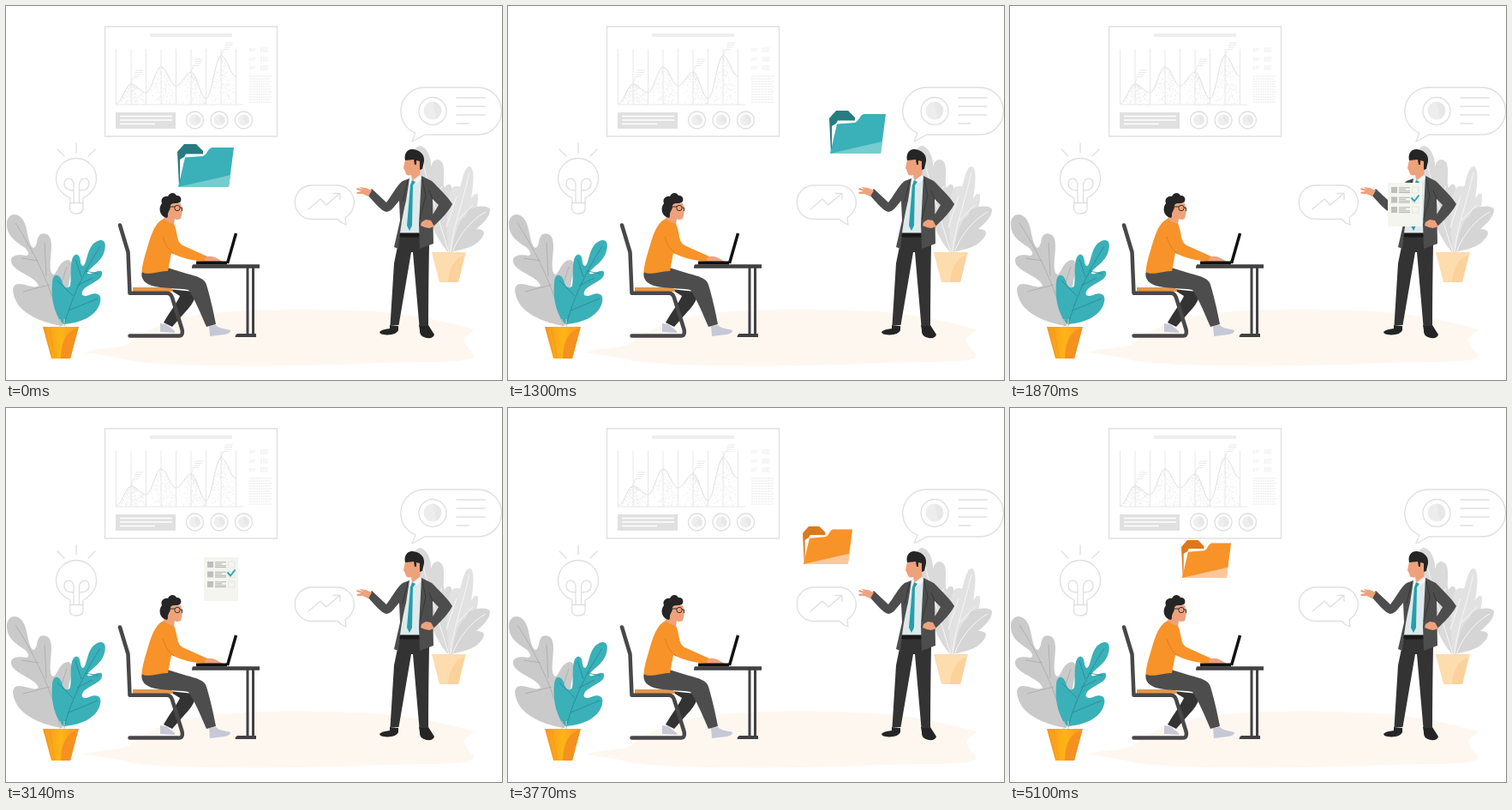
Animation, 579 px wide and 436 px high, one loop 5.77 s. Source, as an HTML page:

```html
<!DOCTYPE html>
<html lang="en">
<head>
<meta charset="utf-8">
<title>Sharing files</title>
<style>
html, body { margin: 0; width: 100%; height: 100%; overflow: hidden; background: #fff; }
svg { display: block; width: 100%; height: 100%; }
.line { fill: none; stroke: #dfdfdf; stroke-width: 1.3; }
.thin { fill: none; stroke: #e2e2e2; stroke-width: .8; }
.round { stroke-linecap: round; stroke-linejoin: round; }
.skin { fill: #eea27b; }
.dark { fill: #333; }
.suit { fill: #4d4d4d; }
.hair { fill: #252525; }
.teal { --back: #267c80; --front: #3ab0b9; --light: #76cccf; }
.orange { --back: #dc791d; --front: #f89329; --light: #fcc89a; }
</style>
</head>
<body>
<svg viewBox="0 0 579 436">
  <defs>
    <linearGradient id="potFill"><stop stop-color="#f7981d"/><stop offset=".5" stop-color="#fdb515"/><stop offset="1" stop-color="#f7981d"/></linearGradient>
    <g id="folder">
      <path d="M0 9 8 0H22L30 8V20L2 49Z" fill="var(--back)"/>
      <path d="M3 18 8 15 10 11.500H34V20L3 47Z" fill="#fff"/>
      <path d="M9 15.500 30 14Q33 13 35 9T40 4H66L60 50H1Z" fill="var(--front)"/>
      <path d="M1 50 62 36 60 50Z" fill="var(--light)"/>
    </g>
    <g id="row">
      <path d="M4 0H11V7H4Z" fill="#bebebe"/>
      <path d="M13 .8H26M13 2.8H21M13 4.8H26M13 6.6H26" stroke="#aaa" stroke-width=".9"/>
      <path d="M28.500 0H36V7H28.500Z" class="thin"/>
    </g>
    <g id="list">
      <path d="M0 0H40V51H0Z" fill="#f4f5ee"/>
      <use href="#row" y="5"/><use href="#row" y="16.500"/><use href="#row" y="28"/>
      <path d="M27.500 17.500 31 21.500 36.500 14.500" fill="none" stroke="#2aabb3" stroke-width="2"/>
    </g>
    <g id="dial">
      <circle r="10" class="line"/><circle r="6.500" fill="#eee"/>
      <path d="M0 0V-6.500A6.500 6.500 0 0 1 4 5Z" fill="#e8e8e8"/>
    </g>
    <g id="note" class="thin"><path d="M1 0H10M0 2.500H9M0 5H7M5 7.500H-1L-4 15"/></g>
  </defs>

  <path fill="#fef7f0" d="M91 404C104 398 134 400 144 393C156 383 180 367 225 360C285 351 375 353 430 356C479 360 518 369 547 377C540 384 533 386 536 392C538 400 548 404 546 409C538 417 492 414 438 416C350 420 210 422 148 414C130 410 109 406 91 404Z"/>

  <g id="panel">
    <path class="line" d="M115.500 24H316.500V152H115.500Z"/>
    <path d="M168 32H264V36H168Z" fill="#eee"/>
    <path id="grid" class="thin"/>
    <path id="dots" fill="none" stroke="#dedede" stroke-width=".7"/>
    <path id="curve" class="line" style="stroke-width:1"/>
    <use href="#note" x="150" y="75"/><use href="#note" x="220" y="62"/><use href="#note" x="255" y="43"/>
    <path id="legend" class="thin" stroke-dasharray="2 .7"/>
    <path d="M128 124H198V143H128Z" fill="#e0e0e0"/>
    <path d="M133 128.500H194M133 133H194M133 137.500H174" stroke="#fff" stroke-width="1.500"/>
    <use href="#dial" x="220.500" y="133"/><use href="#dial" x="249" y="133"/><use href="#dial" x="277.500" y="133"/>
  </g>

  <g id="bulb" class="line round">
    <path d="M75 230V224C65 219 58.500 211 58.500 201A23.500 23.500 0 0 1 105.500 201C105.500 211 99 219 90 224V230"/>
    <path d="M74.500 229.500H90V237Q89 242 82 242T74.500 237Z"/>
    <path d="M79 229V208C78 199 68 199 68 207C68 212 72 215 79 215M85.500 229V208C87 199 97 199 97 207C97 212 93 215 85.500 215"/>
    <path d="M60 167 68 175M82 160V171M104 167 96 175"/>
  </g>

  <g id="bubbles" class="line round">
    <path d="M357 209H386A20 20 0 0 1 396 246.500L397 255Q391 253 387 248.500H357A19.750 19.750 0 0 1 357 209Z"/>
    <path d="M353 237 367 225 374 232 389 219M382 218.500H390V225.500"/>
    <path d="M488 95H551A27.500 27.500 0 0 1 551 150H489L474 158 478 148A27.500 27.500 0 0 1 488 95Z"/>
    <circle cx="498" cy="122.500" r="16"/>
    <circle cx="498" cy="122" r="10.500" fill="#ededed" stroke="none"/>
    <path d="M498 111.500A10.500 10.500 0 0 1 502 131.500Z" fill="#e7e7e7" stroke="none"/>
    <path d="M526 107H559M526 117H559M526 127H559M526 137H540"/>
  </g>

  <g id="rightPlant">
    <path fill="#dadada" d="M516 287C500 270 488 235 480 200C473 177 475 163 484 163C492 165 497 179 496 188C498 178 506 176 510 184C513 196 509 205 512 212C517 204 521 208 521 218L522 287Z"/>
    <path fill="#e2e2e2" d="M517 287C513 255 514 218 522 211C528 208 530 213 531 208C534 195 537 186 542 187C548 192 545 210 543 225C545 220 550 216 551 221C552 237 540 262 518 287Z"/>
    <path fill="#d5d5d5" d="M520 287C523 268 528 252 534 247C541 242 536 238 544 236C553 232 563 233 565 237C565 246 557 253 549 260C558 260 561 264 554 272C545 283 532 283 520 287Z"/>
    <path fill="none" stroke="#f7f7f7" d="M484 173C492 205 505 250 517 287M541 194C533 230 521 260 519 287M500 228 509 210M514 258 526 222M527 250 545 232M560 240C543 249 528 268 521 287"/>
    <path fill="#fddcae" d="M497 287H537L528 322H506Z"/>
    <path fill="#fbd19c" d="M516 322C517 307 524 293 535 291L528 322Z"/>
  </g>

  <g id="leftPlant">
    <path fill="#cacaca" d="M66 373C50 371 25 363 14 348C6 335 6 324 15 324C23 324 33 330 38 326C35 316 13 311 7 301C2 290 15 289 24 291C28 290 26 285 21 281C8 273 0 266 1 252C3 242 11 241 17 246C25 253 24 268 29 279C32 284 34 282 36 276C37 266 42 264 47 266C55 269 53 283 52 295C51 306 52 313 56 313C61 309 62 297 73 296C79 298 77 310 74 320Z"/>
    <path fill="none" stroke="#a9a9a9" stroke-width=".8" d="M11 253C34 288 54 330 64 373M38 297 18 294M47 315 45 276M51 325 20 333M58 343 71 304"/>
    <path fill="#3ab0b9" d="M67 371C57 361 52 341 54 322C55 311 62 312 65 320C67 328 72 331 75 326C77 314 73 292 82 289.500C89 291 85 302 90 303C95 301 94 281 105 275C113 270 118 275 115 285C112 299 97 305 95 311C96 316 109 305 112 310C114 320 97 323 90 331C86 338 91 339 97 337C106 333 112 336 110 345C106 363 84 370 67 371Z"/>
    <path fill="none" stroke="#258890" stroke-width=".8" d="M110 280C96 302 77 336 68 372M92 309 108 312M88 316 81 295M83 326 101 317M78 338 60 320M73 355 107 341"/>
    <path d="M63 365V375M68 365V375" stroke="#cfcfcf"/>
    <path fill="url(#potFill)" d="M43 374H85L75 411H53Z"/>
    <path fill="#f59120" d="M64 411C64 394 70 378 84 376L75 411Z"/>
    <path d="M44 375 54 410M51 376 57 410" stroke="#f59120" stroke-width="1" opacity=".6"/>
  </g>

  <g id="worker">
    <path class="dark" d="M190 330 219 333C224 338 217 349 209 357L194 374 184 369C190 358 199 347 203 338Z"/>
    <path fill="#c6c8d6" d="M180 370 187 371 197 379V381L180 380ZM237 373 245 372C250 377 258 376 262 378Q262 382 255 383L238 385Z"/>
    <path fill="#e69648" d="M148 328H190Q195 329 195 333H148Z"/>
    <path fill="none" stroke="#494748" stroke-width="4.500" class="round" d="M133 255.500 142.500 287 144.500 334.800H187Q192 334 194 340L205.500 377Q207 384.500 202 384.500H144.500"/>
    <path class="suit" d="M159 309C156 318 163 325 174 327C190 330 207 329 213 331C221 343 227 358 234 374L245 371C242 355 238 338 234 325C232 317 222 315 211 312L185 304Z"/>
    <path class="skin" d="M190 231 204 230 206 239 204 248Q199 250 197 248L196 255 183 251Z"/>
    <path class="hair" d="M188 247C180 246 177 236 182 230C180 225 184 221 189 222C191 217 197 217 199 221C204 220 206 226 203 229C199 231 195 229 192 232C193 237 188 240 189 245Z"/>
    <g fill="none" stroke="#38302e"><circle cx="200" cy="235.500" r="3.200"/><path d="M190 234H197M203 235H205.500V239"/></g>
    <path fill="#f79329" d="M184 248C173 253 169 268 164 285C161 295 159 302 158.500 310C165 315 181 308 189 309L193 288C205 294 219 297 232 298L235 292 206 279C198 274 201 264 196 254Q188 252 184 248Z"/>
    <path fill="none" stroke="#dd7719" stroke-width=".8" d="M183 269Q187 283 196 289"/>
    <path class="skin" d="M234 292Q241 291 246 294L253 298H231Z"/>
    <path d="M222 297.500H258V301.500H222Z" fill="#111"/>
    <path d="M258.500 300 268.500 265" stroke="#111" stroke-width="3.500"/>
    <g fill="#414042">
      <path d="M219 301.300H296V305.700H217Q217 301.300 219 301.300ZM280.500 305H283.500V383H280.500ZM287 305H290V383H287Z"/>
      <path d="M270 382H292V386H267.500Q267.500 383 270 382Z"/>
    </g>
  </g>

  <g id="presenter">
    <path class="hair" d="M448 372 458 373V378Q456 383 445 383.500 436 383 436 380 438 377 448 376ZM482 372H493L500 383Q499 388 491 387 482 385 483 378Z"/>
    <path class="dark" d="M460 266H482L494 277Q493 330 493 373H482.500L475 287H473L458.500 372H448.500L453 300Z"/>
    <path fill="#dfe9ec" d="M468 203 474 197 483 199 487 215 482 265H459Z"/>
    <path class="skin" d="M466 179 483 175 484 188 483 199 475 205 473 197Q467 199 466 193L464 189Z"/>
    <path class="hair" d="M466 180C464 172 469 166 475 167C483 168 489 173 488 181L486 190 483 191V181L479 180V185L477 185 476 179Z"/>
    <path fill="#f1f5f6" d="M474 204 483 197 486 201 478 208ZM472 200 475 204 471 209 468 204Z"/>
    <path fill="#23a0aa" d="M474 203 478 205 475 209 474 256 471 262 468 256 472 209Z"/>
    <path d="M459 264.500H483V269.500H459Z" fill="#191919"/>
    <path class="suit" d="M471 201 463 204C456 209 450 222 444 229L427 213 422 220C430 229 438 239 444 240C450 240 455 231 459 227L460 250 453 281 458 283C460 259 464 239 467 227Z"/>
    <path class="suit" d="M485 198 497 204C507 214 518 225 521 231C517 240 506 250 499 257L494 250 505 232 498 225 499 277 483 283 482 255Z"/>
    <path d="M486 202 490 221 483 249M498 225 494 215M463 228 469 203" fill="none" stroke="#343434" stroke-width=".9"/>
    <path class="skin" d="M427 215 423 222 416 219 410 219 409 217 415 216 409 214 410 212 417 214 412 211 420 212ZM496 250 490 249 485 252 484 256 489 258 494 259 500 257Z"/>
  </g>

  <use id="mover"/>
</svg>
<script>
const LOOP = 5770;
// start time, shape, colour class, x, y, scale
const poses = [
  [0, "folder", "teal", 200, 161, 1],
  [700, "folder", "teal", 286, 101, 1],
  [1300, "folder", "teal", 375, 122, 1],
  [1870, "list", "", 441, 206, 1],
  [2470, "list", "", 310, 142, 1],
  [3140, "list", "", 231, 174, 1],
  [3740, "", "", 0, 0, 1],
  [3770, "folder", "orange", 344, 138, .88],
  [4400, "folder", "orange", 275, 129, .88],
  [5100, "folder", "orange", 200, 154, .88]
];
const byId = id => document.getElementById(id);
const setPath = (id, d) => byId(id).setAttribute("d", d);

const LEFT = 128.5, STEP = 17.5, BASE = 115;
const levels = [114, 91, 101, 71, 93, 77, 108, 58, 82];
function curveY(x) {
  const position = (x - LEFT) / STEP;
  const i = Math.min(Math.floor(position), levels.length - 2);
  const blend = (1 - Math.cos(Math.PI * (position - i))) / 2;
  return levels[i] + (levels[i + 1] - levels[i]) * blend;
}

function drawPanel() {
  let grid = `M${LEFT} ${BASE}H277`, curve = "", dots = "", legend = "", seed = 7;
  const random = () => (seed = seed * 16807 % 2147483647) / 2147483647;
  levels.forEach((_, i) => grid += `M${LEFT + i * STEP} 50V${BASE}`);
  for (let x = 0; x <= 140; x++) curve += `${x ? "L" : "M"}${LEFT + x} ${curveY(LEFT + x).toFixed(1)}`;
  for (let i = 0; i < 800; i++) {
    const peak = LEFT + STEP * (1 + 2 * Math.floor(random() * 4));
    const x = Math.min(peak + (random() + random() - .85) * 16, LEFT + 139);
    const top = curveY(x), y = top + random() ** 1.4 * (BASE - top);
    dots += `M${x.toFixed(1)} ${y.toFixed(1)}h.7`;
  }
  for (const y of [50, 61, 71]) legend += `M284 ${y}h8m-8 2h6m7 -3h9m-9 2h8m-8 2h9`;
  for (let y = 82; y < 114; y += 3) legend += `M284 ${y}h${y % 2 ? 25 : 27}`;
  setPath("grid", grid);
  setPath("curve", curve);
  setPath("dots", dots);
  setPath("legend", legend);
}

const mover = byId("mover");
let shown;
function render(now) {
  const time = now % LOOP;
  const pose = poses.findLast(([start]) => start <= time);
  if (pose !== shown) {
    const [, shape, colour, x, y, scale] = shown = pose;
    mover.setAttribute("href", "#" + shape);
    mover.setAttribute("class", colour);
    mover.setAttribute("transform", `translate(${x} ${y}) scale(${scale})`);
  }
  requestAnimationFrame(render);
}
drawPanel();
render(performance.now());
</script>
</body>
</html>
```
